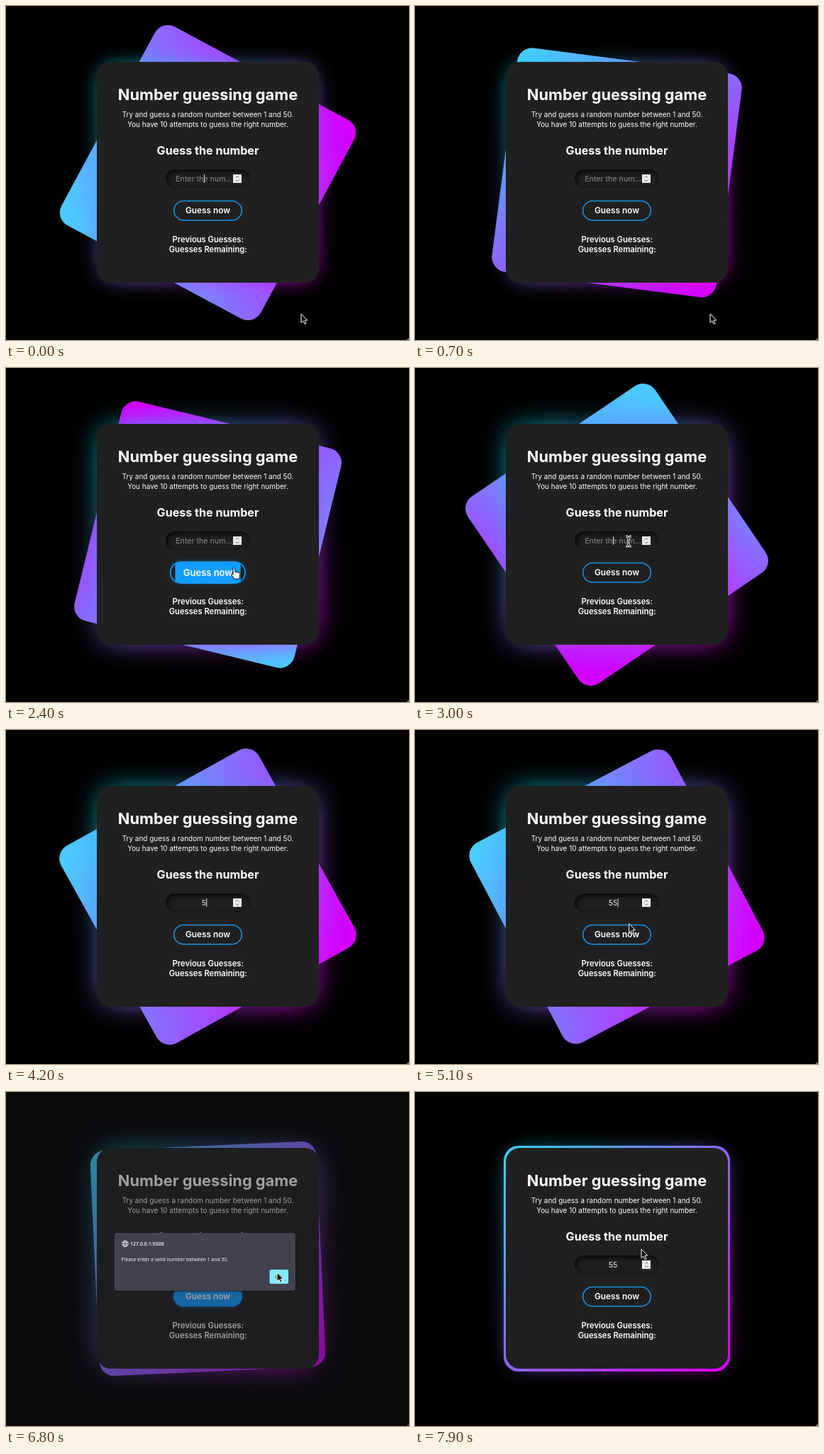
An HTML page for the animation above (8000 ms loop, 568 by 472 pixels).

```html
<!DOCTYPE html>
<html lang="en">
<head>
<meta charset="utf-8">
<title>Number guessing game</title>
<style>
  html, body { margin: 0; width: 568px; height: 472px; overflow: hidden; background: #000; }
  svg { display: block; }
  text { font-family: Inter, "Open Sans", sans-serif; fill: #fff; text-anchor: middle; }
  .semi { font-weight: 600; }
  .bold { font-weight: 700; }
  #dialog text { font-family: "Open Sans", "Noto Sans", sans-serif; text-anchor: start; }
</style>
</head>
<body>
<svg width="568" height="472" viewBox="0 0 568 472">
  <defs>
    <linearGradient id="tile" x1="0" y1="0" x2="1" y2="1">
      <stop offset="0.04" stop-color="#4acbff"/><stop offset="0.96" stop-color="#d400ff"/>
    </linearGradient>
    <linearGradient id="halo" x1="0" y1="0" x2="1" y2="1">
      <stop offset="0" stop-color="#00dbde"/><stop offset="1" stop-color="#fc00ff"/>
    </linearGradient>
    <filter id="blur" filterUnits="userSpaceOnUse" x="0" y="0" width="568" height="472" color-interpolation-filters="sRGB">
      <feGaussianBlur id="blurSize" stdDeviation="15"/>
    </filter>
    <filter id="soft" x="-30%" y="-60%" width="160%" height="220%"><feGaussianBlur stdDeviation="4"/></filter>
    <clipPath id="pill"><rect x="225" y="231" width="119" height="26" rx="13"/></clipPath>
    <clipPath id="btnClip"><rect x="-48" y="-14" width="96" height="28" rx="14"/></clipPath>
  </defs>

  <rect width="568" height="472"/>
  <rect id="square" x="-159.5" y="-159.5" width="319" height="319" rx="21" fill="url(#tile)"/>
  <rect x="136" y="87" width="297" height="297" rx="19" fill="url(#halo)" filter="url(#blur)"/>
  <rect x="128" y="79" width="313" height="312" rx="20" fill="#202020"/>

  <text class="bold" x="284.5" y="133" font-size="21.8">Number guessing game</text>
  <g font-size="9.97">
    <text x="284.5" y="157">Try and guess a random number between 1 and 50.</text>
    <text x="284.5" y="171">You have 10 attempts to guess the right number.</text>
  </g>
  <text class="bold" x="284.5" y="209.5" font-size="16.1">Guess the number</text>

  <g clip-path="url(#pill)">
    <rect x="225" y="231" width="119" height="26" fill="#1f1f1f"/>
    <rect x="223" y="229" width="127" height="36" rx="16" fill="none" stroke="#050505" stroke-width="8" filter="url(#soft)"/>
  </g>
  <text id="entry" x="279" y="247.6" font-size="10.7"></text>
  <path id="caret" d="M0 238v12" stroke="#ddd"/>
  <rect x="320" y="238" width="12" height="12" fill="#ececec"/>
  <path d="M323.7 242.5l2.3-2 2.3 2M323.7 245.7l2.3 2 2.3-2" fill="none" stroke="#666" stroke-width="0.9"/>

  <g id="button">
    <rect id="shine" x="-48" y="-14" width="96" height="28" rx="14" fill="#149bff" filter="url(#soft)"/>
    <rect x="-48" y="-14" width="96" height="28" rx="14" fill="#202020"/>
    <rect id="fill" y="-14" height="28" rx="3" fill="#129dff" clip-path="url(#btnClip)"/>
    <rect x="-47.8" y="-13.6" width="95.6" height="27.4" rx="13.7" fill="none" stroke="#1b93e8" stroke-width="1.5"/>
    <text class="semi" y="4.2" font-size="11.8">Guess now</text>
  </g>

  <g class="semi" font-size="11.2">
    <text x="284.8" y="333.6">Previous Guesses:</text>
    <text x="284.8" y="348">Guesses Remaining:</text>
  </g>
  <path d="M568 469v3h-4z" fill="#777"/>

  <g id="dialog">
    <rect width="568" height="472" fill="#1c1b22" opacity="0.42"/>
    <rect x="151.5" y="198" width="257.5" height="84.5" rx="5" fill="#000" opacity="0.35"/>
    <rect x="152.5" y="199" width="255.5" height="82" rx="4" fill="#42414d"/>
    <g fill="none" stroke="#fff" stroke-width="0.8">
      <circle cx="168" cy="214.4" r="4.2"/>
      <ellipse cx="168" cy="214.4" rx="1.9" ry="4.2"/>
      <path d="M164.2 212.8h7.6M164.2 216h7.6"/>
    </g>
    <text class="semi" x="175" y="217" font-size="7">127.0.0.1:5500</text>
    <text x="162.5" y="239" font-size="6.9">Please enter a valid number between 1 and 50.</text>
    <rect id="ok" x="371.5" y="251" width="26.5" height="20" rx="2.5"/>
    <text x="379.3" y="264" font-size="7.4" style="fill:#15141a">OK</text>
  </g>

  <g id="cursor">
    <path id="arrow" transform="scale(0.88)" d="M0 0V14.3L3.3 11.3L5.6 16.4L8 15.3L5.8 10.4H10Z" fill="#111" stroke="#fff" stroke-width="1.1" stroke-linejoin="round"/>
    <path id="hand" d="M-1 0.5Q0.5-1 1.8 0.5V5L7.5 6.3Q9 6.8 8.8 9L7.8 15H0.8L-3.6 8.8Q-3.2 7.2-1 8.8Z" fill="#fff" stroke="#111" stroke-width="1"/>
    <g id="beam" fill="none">
      <path d="M-4-7Q0-7 0-4Q0-7 4-7M0-5V5M-4 7Q0 7 0 4Q0 7 4 7" stroke="#fff" stroke-width="3"/>
      <path d="M-4-7Q0-7 0-4Q0-7 4-7M0-5V5M-4 7Q0 7 0 4Q0 7 4 7" stroke="#111"/>
    </g>
  </g>
</svg>
<script>
const LOOP = 8000, TURN = 1030, FREEZE = 5890, OPEN = 5850, CLOSE = 7500;
const $ = id => document.getElementById(id);
const set = (id, attrs) => { for (const k in attrs) $(id).setAttribute(k, attrs[k]); };
const show = (id, on) => set(id, { visibility: on ? 'visible' : 'hidden' });
const clamp = v => Math.max(0, Math.min(1, v));
const ramp = (t, start, span) => clamp((t - start) / span);
const within = (t, a, b) => t >= a && t < b;

// [time, degrees]; before TURN the swing runs mirrored
const SWING = [[1030, 0], [1300, 6.5], [1530, 8.5], [1700, 6.3], [1800, 0], [2060, -62],
  [2400, -166], [2700, -243], [3000, -304], [3335, -344.5], [3505, -359], [3760, -374],
  [4200, -389], [4600, -393], [5063, -388.4], [5400, -381], [5770, -370], [5890, -362.6]];

// [time, x, y] of the pointer tip
const PATH = [[0, 416, 435], [1500, 416, 435], [1700, 402, 424], [2000, 350, 330], [2300, 321, 283],
  [2480, 321, 283], [2700, 301, 245], [4850, 301, 245], [5200, 302, 285], [5650, 302, 285],
  [5900, 287, 254], [6300, 413, 262], [6400, 413, 262], [6500, 413, 250], [6600, 413, 250],
  [6700, 400, 250], [6800, 382, 255], [7400, 382, 255], [7900, 319, 222]];

function segment(list, t) {
  let i = 0;
  while (i < list.length - 2 && t >= list[i + 1][0]) i++;
  return i;
}

function slope(p, i) {
  const a = p[Math.max(0, i - 1)], b = p[Math.min(p.length - 1, i + 1)];
  return (b[1] - a[1]) / (b[0] - a[0]);
}

function hermite(p, t) {
  const i = segment(p, t), a = p[i], b = p[i + 1], h = b[0] - a[0];
  const s = (t - a[0]) / h, r = 1 - s;
  return r * r * ((1 + 2 * s) * a[1] + s * h * slope(p, i)) +
    s * s * ((1 + 2 * r) * b[1] - r * h * slope(p, i + 1));
}

function angle(t) {
  if (t >= CLOSE) return -2.6 * (1 - ramp(t, CLOSE, 380));
  const u = t < TURN ? 2 * TURN - t : Math.min(t, FREEZE);
  return hermite(SWING, u);
}

function pointer(t) {
  const i = segment(PATH, t), a = PATH[i], b = PATH[i + 1], s = ramp(t, a[0], b[0] - a[0]);
  return [a[1] + (b[1] - a[1]) * s, a[2] + (b[2] - a[2]) * s];
}

function drawEntry(t) {
  const typed = t < 3950 ? '' : t < 4600 ? '5' : '55';
  $('entry').textContent = typed || 'Enter the num…';
  $('entry').style.fill = typed ? '#e6e6e6' : '#8b8b8b';
  const focused = t < 2000 || within(t, 2700, 5500);
  show('caret', focused && t % 1000 < 500);
  set('caret', { transform: `translate(${279.5 + typed.length * 3.3} 0)` });
}

function drawButton(t) {
  const first = Math.min(ramp(t, 2200, 230), 1 - ramp(t, 2520, 150));
  const second = Math.min(ramp(t, 5130, 230), 1 - ramp(t, 7520, 200));
  const fill = Math.max(first, second);
  const grow = Math.max(
    Math.min(ramp(t, 2200, 120), 1 - ramp(t, 2520, 150)),
    Math.min(ramp(t, 5130, 120), 1 - ramp(t, 5500, 150)));
  set('button', { transform: `translate(284.5 289) scale(${1 + 0.1 * grow})` });
  set('fill', { x: -48 * fill, width: 96 * fill });
  set('shine', { opacity: 0.35 * fill });
}

function drawPointer(t, modal) {
  const [x, y] = pointer(t);
  const hand = !modal && within(x, 236, 333) && within(y, 275, 304);
  const beam = !modal && within(x, 225, 320) && within(y, 231, 258);
  const seen = !within(t, 3900, 4850);
  set('cursor', { transform: `translate(${x} ${y})` });
  show('arrow', seen && !hand && !beam);
  show('hand', seen && hand);
  show('beam', seen && beam);
}

function draw(t) {
  const modal = within(t, OPEN, CLOSE);
  const glow = Math.min(ramp(t, 1830, 500), 1 - ramp(t, CLOSE, 380));
  set('square', { transform: `translate(284.5 235.5) rotate(${angle(t)})` });
  set('blurSize', { stdDeviation: 15 + 5 * glow });
  drawEntry(t);
  drawButton(t);
  show('dialog', modal);
  set('ok', { fill: t >= 7300 ? '#aaf2ff' : t >= 6750 ? '#80ebff' : '#00e9ff' });
  drawPointer(t, modal);
}

const start = performance.now();
function frame() {
  draw((performance.now() - start) % LOOP);
  requestAnimationFrame(frame);
}
frame();
</script>
</body>
</html>
```
